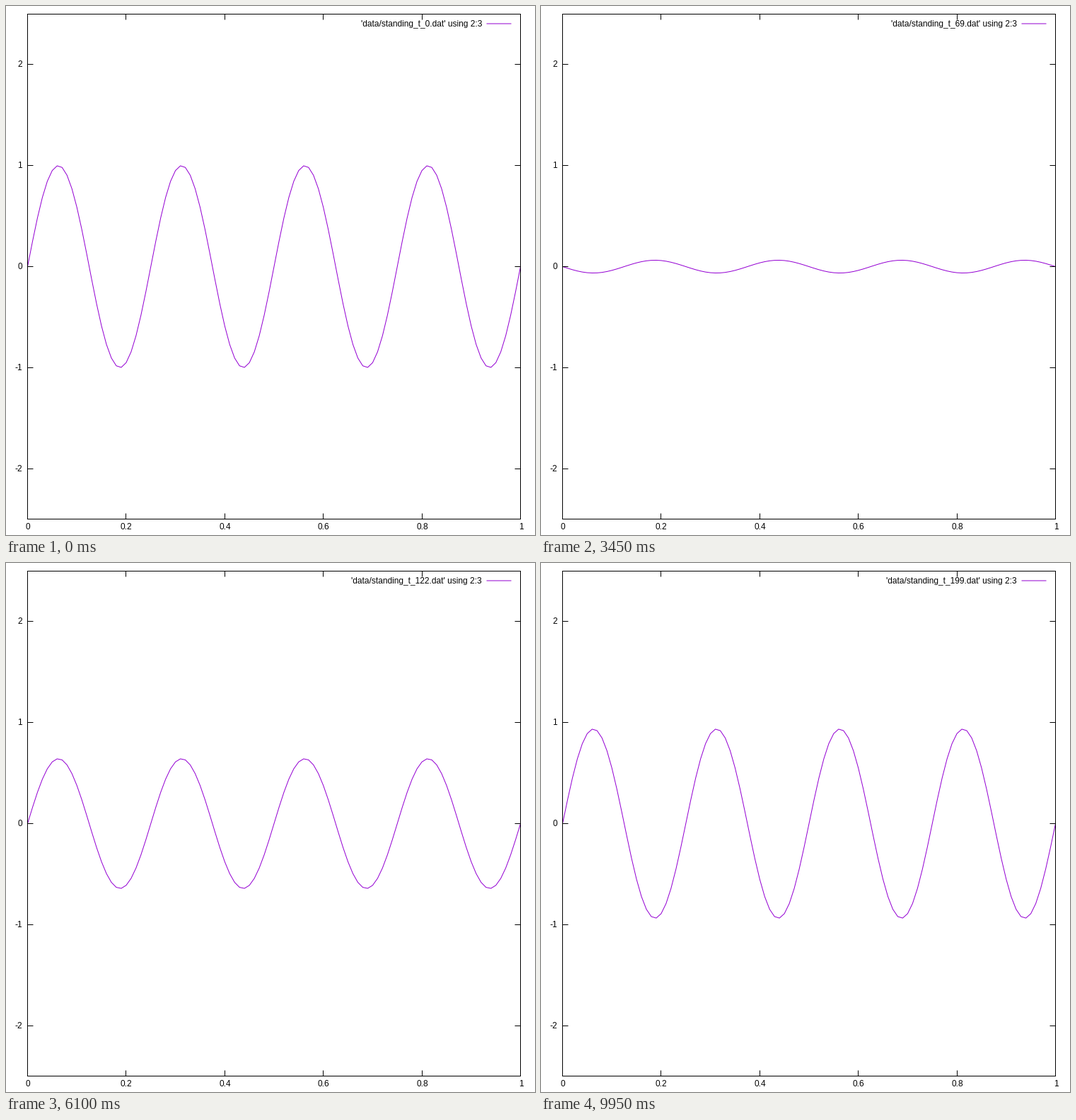
A matplotlib script for the animation above (10000 ms loop, 748 by 748 pixels).

```python
import numpy as np
import matplotlib.pyplot as plt
from matplotlib.animation import FuncAnimation
from matplotlib.patches import Rectangle

SIZE, DPI = 748, 88
LEFT, RIGHT, TOP, BOTTOM = 30, 727, 11, 725
TICK = 8.5
PIXEL = 72 / DPI  # one pixel in points
VIOLET = "#9400d3"
FRAMES, INTERVAL = 200, 50
PERIOD = 25  # frames per oscillation

plt.rcParams["font.family"] = "Liberation Sans"
plt.rcParams["text.hinting"] = "native"
plt.rcParams["path.simplify"] = False

fig = plt.figure(figsize=(SIZE / DPI, SIZE / DPI), dpi=DPI, facecolor="white")
ax = fig.add_axes([0, 0, 1, 1])
ax.set_xlim(0, SIZE)
ax.set_ylim(SIZE, 0)
ax.axis("off")


def to_x(v):
    return LEFT + v * (RIGHT - LEFT)


def to_y(v):
    return (TOP + BOTTOM) / 2 - v * (BOTTOM - TOP) / 5


def bar(x, y, w, h):
    ax.add_patch(Rectangle((x, y), w, h, facecolor="black", linewidth=0,
                           snap=False, zorder=3))


def label(x, y, text, align):
    return ax.text(x, y, text, fontsize=12 * PIXEL, ha=align, va="baseline",
                   color="black", zorder=4)


def stroke(xs, ys):
    line, = ax.plot(xs, ys, color=VIOLET, linewidth=PIXEL, snap=False,
                    solid_capstyle="butt", solid_joinstyle="round", zorder=2)
    return line


def amplitude(n):
    """Leapfrog solution that starts with two equal steps around rest."""
    step = 2 * np.pi / PERIOD
    return np.cos(step * (n - 0.5)) / np.cos(step / 2)


# Border
for y in (TOP, BOTTOM):
    bar(LEFT, y, RIGHT - LEFT + 1, 1)
for x in (LEFT, RIGHT):
    bar(x, TOP, 1, BOTTOM - TOP + 1)

# Ticks and their labels
for i in range(6):
    x = round(to_x(i / 5))
    bar(x, TOP, 1, TICK)
    bar(x, BOTTOM + 1 - TICK, 1, TICK)
    label(x + 1, 740, f"{i / 5:g}", "center")
for v in range(-2, 3):
    y = round(to_y(v))
    bar(LEFT, y, TICK, 1)
    bar(RIGHT + 1 - TICK, y, TICK, 1)
    label(23, y + 4, str(v), "right")

# Legend
stroke([679.5, 714.5], [25, 25])
title = label(673, 28, "", "right")

grid = np.linspace(0, 1, 101)
shape = np.sin(8 * np.pi * grid)
wave = stroke(to_x(grid) + 0.5, to_y(shape) + 0.5)


def draw(n):
    wave.set_ydata(to_y(amplitude(n) * shape) + 0.5)
    title.set_text(f"'data/standing_t_{n}.dat' using 2:3")
    return wave, title


anim = FuncAnimation(fig, draw, frames=FRAMES, interval=INTERVAL,
                     repeat=True, repeat_delay=0, blit=False)
plt.show()
```
